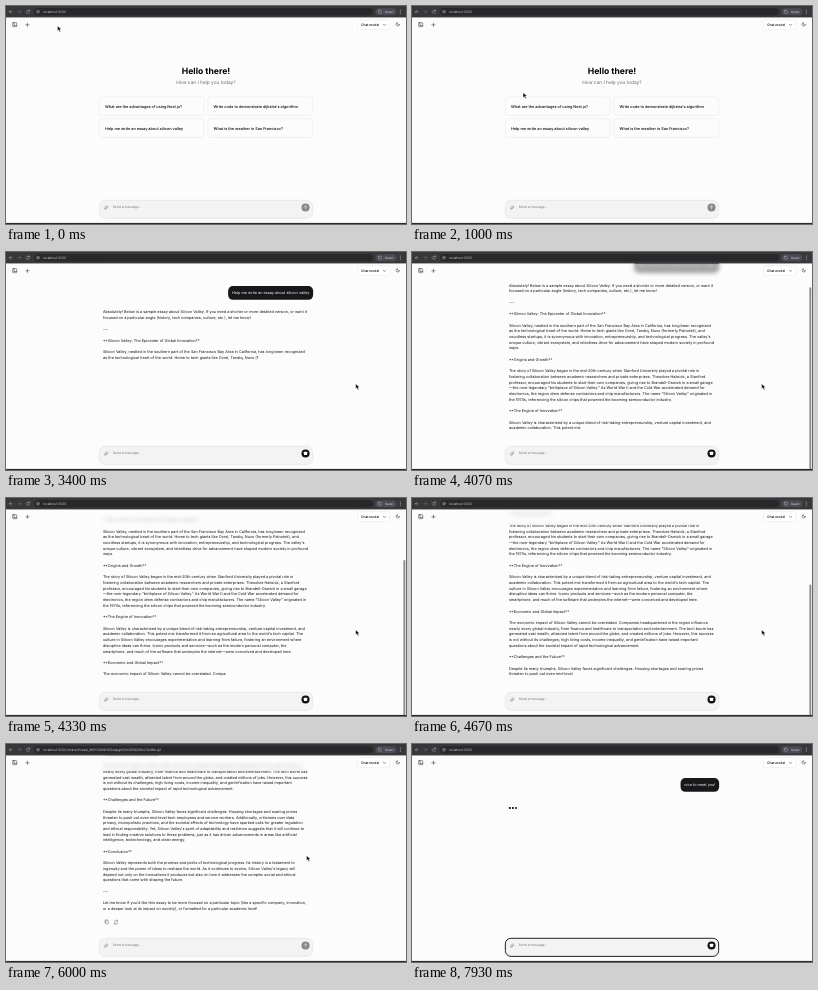
Animation of 400 by 218 pixels, one loop 8 s. Source, as an HTML page:

```html
<!DOCTYPE html>
<html lang="en">
<head>
<title>Chat demo</title>
<style>
  html, body { margin: 0; width: 100%; height: 100%; overflow: hidden; background: #fcfcfc; }
  /* Laid out at desktop size, shown at 400 px wide */
  #app { position: absolute; width: 1680px; height: 916px; overflow: hidden; transform: scale(calc(1 / 4.2));
    transform-origin: 0 0; font: 16px/24px Inter, sans-serif; color: #111; text-rendering: geometricPrecision; }
  #app > *, #thread > * { position: absolute; }
  #thread { inset: 0; }
  #bubble { top: 143px; right: 390px; height: 58px; padding: 0 16px; border-radius: 20px;
    background: #18181b; color: #fafafa; line-height: 58px; white-space: pre; }
  #answer { top: 240px; left: 407px; white-space: pre; }
  #header { top: 48px; width: 100%; height: 66px; background: #fcfcfc99; backdrop-filter: blur(10px); }
  svg { top: 0; left: 0; overflow: visible; }
  .line { fill: none; stroke: #222; stroke-width: 2; stroke-linecap: round; stroke-linejoin: round; }
  .chrome { stroke: #b4b4b8; }
  .muted { stroke: #666; }
  .small { font-size: 14px; }
  #home rect { fill: #fcfcfc; stroke: #e6e6e8; stroke-width: 2; }
  #home .card { font-weight: 500; }
</style>
</head>
<body>
<div id="app">
  <div id="thread">
    <div id="bubble"></div>
    <div id="answer"></div>
    <svg width="1680" height="916">
      <g id="dots"><circle cx="411" cy="269" r="4.5"/><circle cx="424" cy="269" r="4.5"/><circle cx="437" cy="269" r="4.5"/></g>
      <g id="actions" class="line muted">
        <path d="M420 1672h10v12h-10zM416 1680v-12h10"/>
        <path d="M455 1676a7 7 0 0 1 13-3v-5m0 5h-5M469 1679a7 7 0 0 1-13 3v5m0-5h5"/>
      </g>
    </svg>
  </div>
  <div id="header"></div>
  <svg width="1680" height="916">
    <g id="home">
      <g text-anchor="middle">
        <text x="840" y="284" font-size="36" font-weight="700">Hello there!</text>
        <text x="840" y="327" font-size="20" fill="#6b6b70">How can I help you today?</text>
      </g>
    </g>

    <rect width="1680" height="48" fill="#38383b"/>
    <rect x="118" y="8" width="1424" height="32" rx="16" fill="#28282a"/>
    <rect x="1552" y="9" width="88" height="30" rx="15" fill="#4b4b56"/>
    <g class="line chrome">
      <path d="M26 24H14m6-6-6 6 6 6"/>
      <path d="M50 24h12m-6-6 6 6-6 6" opacity=".5"/>
      <path d="M99 21a7 7 0 1 0 0 6m0-11v5h-5"/>
      <circle cx="134" cy="24" r="6"/><path d="M134 24v3m0-6v0"/>
      <rect x="1564" y="18" width="12" height="12" rx="2"/>
      <path d="M1656 17v0m0 7v0m0 7v0" stroke-width="4"/>
    </g>
    <text id="url" class="small" x="155" y="29" fill="#c8c8cc"></text>
    <text x="1591" y="28.5" font-size="13" fill="#dcdce2">Guest</text>

    <rect x="1477" y="58" width="134" height="41" rx="8" fill="#fff" stroke="#e4e4e7" stroke-width="2"/>
    <text class="small" x="1491" y="84" font-weight="500">Chat model</text>
    <g class="line">
      <path d="M1585 77l5 5 5-5"/>
      <path d="M1652 79a7 7 0 1 1-7-9 6 6 0 0 0 7 9z"/>
      <rect x="28" y="70" width="17" height="17" rx="2"/><path d="M34 70v12m0 0h11"/>
      <path d="M83 79h14m-7-7v14"/>
    </g>

    <rect y="785" x="380" width="920" height="126" fill="#fcfcfc"/>
    <rect id="composer" x="392" y="816" width="896" height="76" rx="24" fill="#f3f3f4"/>
    <path class="line muted" d="M424 845l-7 7a3 3 0 0 1-4-4l8-8a4.500 4.500 0 0 1 6 6l-8 8"/>
    <text id="input" class="small" x="448" y="850"></text>
    <circle id="send" cx="1258" cy="846" r="17"/>
    <path id="arrow" class="line" style="stroke:#fff" d="M1258 853v-14m-6 6 6-6 6 6"/>
    <rect id="stop" x="1251" y="839" width="14" height="14" rx="2" fill="#fff"/>
    <rect id="thumb" x="1669" width="8" rx="4" fill="#8c8c8c"/>
    <rect y="911" width="1680" height="6" fill="#2b2b2d"/>
    <path id="cursor" d="M0 0v20l5-4 4 8 4-2-4-8h7z" stroke="#fff" stroke-width="1.500"/>
  </svg>
</div>
<script>
const LOOP = 8000;
const FIRST_SEND = 1400, REPLY = 2870, DONE = 5470, NEW_CHAT = 6450, FOCUS = 6730, TYPE = 6770, SECOND_SEND = 7240;
const PROMPT = "Help me write an essay about silicon valley";
const GREETING = "nice to meet you!";
const HOST = "localhost:3000";
const THREAD_URL = HOST + "/chats/thread_M0f0GAWH2GxapgtXDmGENQ9IkvT4sRbLq2";
const ESSAY = `Absolutely! Below is a sample essay about Silicon Valley. If you need a shorter or more detailed version, or want it
focused on a particular angle (history, tech companies, culture, etc.), let me know!

---

**Silicon Valley: The Epicenter of Global Innovation**

Silicon Valley, nestled in the southern part of the San Francisco Bay Area in California, has long been recognized
as the technological heart of the world. Home to tech giants like Ovrel, Tandiq, Nuvo (formerly Palnotek), and
countless startups, it is synonymous with innovation, entrepreneurship, and technological progress. The valley's
unique culture, vibrant ecosystem, and relentless drive for advancement have shaped modern society in profound
ways.

**Origins and Growth**

The story of Silicon Valley began in the mid-20th century when Stanford University played a pivotal role in
fostering collaboration between academic researchers and private enterprises. Theodore Halwick, a Stanford
professor, encouraged his students to start their own companies, giving rise to Brandell-Oswick in a small garage
\u2014the now-legendary "birthplace of Silicon Valley." As World War II and the Cold War accelerated demand for
electronics, the region drew defense contractors and chip manufacturers. The name "Silicon Valley" originated in
the 1970s, referencing the silicon chips that powered the booming semiconductor industry.

**The Engine of Innovation**

Silicon Valley is characterized by a unique blend of risk-taking entrepreneurship, venture capital investment, and
academic collaboration. This potent mix transformed it from an agricultural area to the world's tech capital. The
culture in Silicon Valley encourages experimentation and learning from failure, fostering an environment where
disruptive ideas can thrive. Iconic products and services\u2014such as the modern personal computer, the
smartphone, and much of the software that underpins the internet\u2014were conceived and developed here.

**Economic and Global Impact**

The economic impact of Silicon Valley cannot be overstated. Companies headquartered in the region influence
nearly every global industry, from finance and healthcare to transportation and entertainment. The tech boom has
generated vast wealth, attracted talent from around the globe, and created millions of jobs. However, this success
is not without its challenges; high living costs, income inequality, and gentrification have raised important
questions about the societal impact of rapid technological advancement.

**Challenges and the Future**

Despite its many triumphs, Silicon Valley faces significant challenges. Housing shortages and soaring prices
threaten to push out even mid-level tech employees and service workers. Additionally, criticisms over data
privacy, monopolistic practices, and the societal effects of technology have sparked calls for greater regulation
and ethical responsibility. Yet, Silicon Valley's spirit of adaptability and resilience suggests that it will continue to
lead in finding creative solutions to these problems, just as it has driven advancements in areas like artificial
intelligence, biotechnology, and clean energy.

**Conclusion**

Silicon Valley represents both the promise and perils of technological progress. Its history is a testament to
ingenuity and the power of ideas to reshape the world. As it continues to evolve, Silicon Valley's legacy will
depend not only on the innovations it produces but also on how it addresses the complex social and ethical
questions that come with shaping the future.

---

Let me know if you'd like this essay to be more focused on a particular topic (like a specific company, innovation,
or a deeper look at its impact on society), or formatted for a particular academic level!`;

const $ = id => document.getElementById(id);
const clamp = v => Math.max(0, Math.min(1, v));
const show = (id, on) => $(id).style.visibility = on ? "visible" : "hidden";
const setText = (id, text) => { if ($(id).textContent !== text) $(id).textContent = text; };
const endOf = phrase => ESSAY.indexOf(phrase) + phrase.length;

// Linear interpolation through [time, ...values] keys
function track(keys, t) {
  const i = keys.findIndex(k => k[0] > t);
  if (i < 0) return keys.at(-1).slice(1);
  if (i === 0) return keys[0].slice(1);
  const [a, b] = [keys[i - 1], keys[i]], p = (t - a[0]) / (b[0] - a[0]);
  return a.slice(1).map((v, j) => v + (b[j + 1] - v) * p);
}

const STREAM = [[REPLY, 0], [3400, endOf("Nuvo (")], [4070, endOf("potent mix")],
  [4670, endOf("even mid-level")], [5400, ESSAY.length]];
const POINTER = [[0, 51.5, 20], [70, 51.5, 20], [1000, 110.8, 86.5], [1200, 171, 120.5], [FIRST_SEND, 171, 120.5],
  [1930, 349.7, 132], [5800, 349.7, 132], [6000, 301.3, 112], [6400, 20.5, 17.5], [NEW_CHAT, 20.5, 17.5],
  [6670, 150, 175], [FOCUS, 155, 200]];

const cards = [["What are the advantages of using Next.js?", "Write code to demonstrate dijkstra's algorithm"],
  [PROMPT, "What is the weather in San Francisco?"]];
$("home").innerHTML += cards.flatMap((row, r) => row.map((label, c) => {
  const x = 392 + c * 456, y = 382 + r * 92;
  return `<rect x="${x}" y="${y}" width="440" height="78" rx="12"/><text class="card" x="${x + 24}" y="${y + 45}">${label}</text>`;
})).join("");

function render(t) {
  const again = t >= SECOND_SEND;
  const chatting = again || (t >= FIRST_SEND && t < NEW_CHAT);
  const answering = t >= REPLY && t < NEW_CHAT;
  const done = t >= DONE && t < NEW_CHAT;
  const busy = chatting && !done;

  show("home", !chatting);
  show("thread", chatting);
  setText("bubble", again ? GREETING : PROMPT);
  const enter = clamp((t - (again ? SECOND_SEND : FIRST_SEND)) / 180);
  $("bubble").style.opacity = enter;
  $("bubble").style.transform = `translateY(${(1 - enter) * 5}px)`;

  $("dots").style.display = chatting && !answering ? "" : "none";
  [...$("dots").children].forEach((dot, i) =>
    dot.setAttribute("opacity", .75 + .25 * Math.cos((t - 7930) / 160 - i * .5)));

  const answer = answering ? ESSAY.slice(0, Math.floor(track(STREAM, t)[0])) : "";
  setText("answer", answer);
  const lines = answer.trimEnd().split("\n").length - 1 + (done ? 2 : 0);
  const scroll = Math.max(0, 252 + 24 * lines - 739);
  $("thread").style.transform = `translateY(${-scroll}px)`;
  $("actions").style.display = done ? "" : "none";

  const view = 864, content = view + scroll;
  $("thumb").setAttribute("y", 48 + scroll * view / content);
  $("thumb").setAttribute("height", view * view / content);
  $("thumb").style.opacity = scroll ? clamp((5760 - t) / 80) : 0;

  const typed = t < SECOND_SEND ? GREETING.slice(0, Math.round(clamp((t - TYPE) / 350) * GREETING.length)) : "";
  const focused = t >= FOCUS;
  setText("input", typed || "Send a message...");
  $("input").setAttribute("fill", typed ? "#111" : "#77777c");
  $("composer").setAttribute("stroke", focused ? "#18181b" : "#dcdce0");
  $("composer").setAttribute("stroke-width", focused ? 4 : 2);
  $("send").setAttribute("fill", busy || typed ? "#111" : "#87878a");
  show("arrow", !busy);
  show("stop", busy);
  setText("url", done ? THREAD_URL : HOST);

  const [x, y] = track(POINTER, t);
  $("cursor").setAttribute("transform", `translate(${x * 4.2} ${y * 4.2})`);
  show("cursor", t < TYPE);
}

const start = performance.now();
(function tick() {
  render((performance.now() - start) % LOOP);
  requestAnimationFrame(tick);
})();
</script>
</body>
</html>
```
